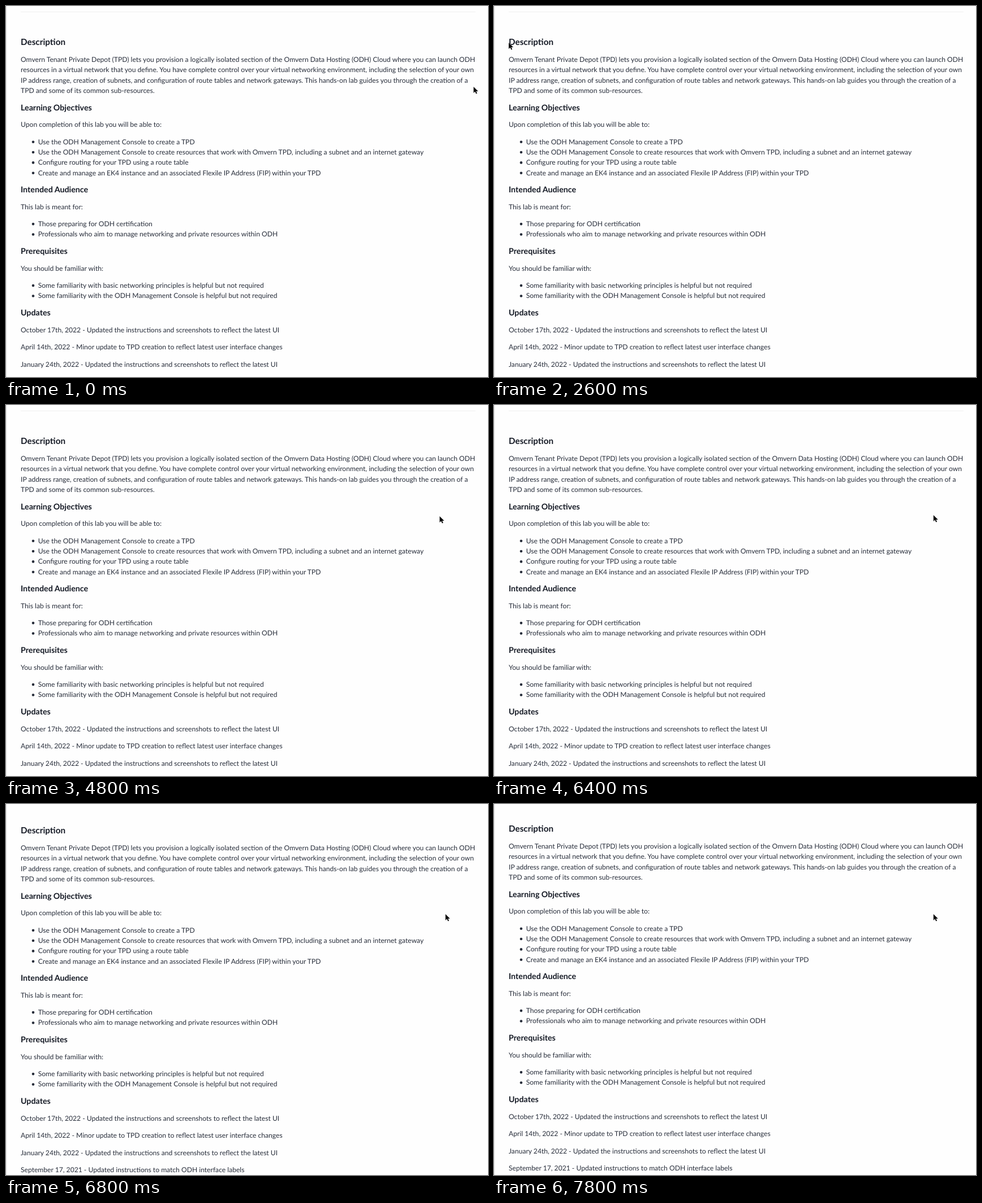
Recreate the animation shown at these times as an HTML page. Size 852 by 657 pixels, loop 8 s.

```html
<!DOCTYPE html>
<html lang="en">
<head>
<meta charset="utf-8">
<title>Lab overview</title>
<style>
  html, body { margin: 0; width: 100%; height: 100%; overflow: hidden; background: #fefefe; }
  svg { display: block; width: 852px; height: 657px; }
  text { font: 12.11px Lato, sans-serif; fill: #272d3a; text-rendering: geometricPrecision; }
  .heading { font-weight: 700; font-size: 14.25px; fill: #161b26; }
  .title { font-size: 15.25px; }
  circle { fill: #272d3a; }
</style>
</head>
<body>
<svg viewBox="0 0 852 657">
  <rect width="852" height="657" fill="#fefefe"/>
  <rect width="1.5" height="657" fill="#ebebeb"/>
  <g id="page"><rect x="26" y="10" width="804" height="1" fill="#f0f0f0"/></g>
  <path id="cursor" d="M0 0V11L2.6 8.6 4.4 12.6 6.3 11.8 4.6 8H8Z" fill="#0a0a0a" stroke="#fff" stroke-width="1" paint-order="stroke"/>
</svg>
<script>
const LOOP = 8000, STEP = 200, LINE = 18.35, PARAGRAPH = 30.55;
const page = document.getElementById('page');
const cursor = document.getElementById('cursor');

function add(tag, attrs, content = '') {
  const node = document.createElementNS('http://www.w3.org/2000/svg', tag);
  for (const name in attrs) node.setAttribute(name, attrs[name]);
  node.textContent = content;
  page.append(node);
}

const heading = (y, content, extra = '') => add('text', { x: 26, y, class: 'heading ' + extra }, content);

const lines = (y, contents, gap = LINE) =>
  contents.forEach((content, i) => add('text', { x: 26, y: y + i * gap }, content));

const bullets = (y, contents) => contents.forEach((content, i) => {
  const base = y + i * LINE;
  add('circle', { cx: 48, cy: base - 3.9, r: 2.3 });
  add('text', { x: 56.7, y: base }, content);
});

heading(69.4, 'Description', 'title');
lines(99, [
  'Omvern Tenant Private Depot (TPD) lets you provision a logically isolated section of the Omvern Data Hosting (ODH) Cloud where you can launch ODH',
  'resources in a virtual network that you define. You have complete control over your virtual networking environment, including the selection of your own',
  'IP address range, creation of subnets, and configuration of route tables and network gateways. This hands-on lab guides you through the creation of a',
  'TPD and some of its common sub-resources.'
]);

heading(185, 'Learning Objectives');
lines(214.2, ['Upon completion of this lab you will be able to:']);
bullets(244.6, [
  'Use the ODH Management Console to create a TPD',
  'Use the ODH Management Console to create resources that work with Omvern TPD, including a subnet and an internet gateway',
  'Configure routing for your TPD using a route table',
  'Create and manage an EK4 instance and an associated Flexile IP Address (FIP) within your TPD'
]);

heading(330.4, 'Intended Audience');
lines(359.6, ['This lab is meant for:']);
bullets(390, [
  'Those preparing for ODH certification',
  'Professionals who aim to manage networking and private resources within ODH'
]);

heading(439.4, 'Prerequisites');
lines(468.6, ['You should be familiar with:']);
bullets(499, [
  'Some familiarity with basic networking principles is helpful but not required',
  'Some familiarity with the ODH Management Console is helpful but not required'
]);

heading(548.3, 'Updates');
lines(577.6, [
  'October 17th, 2022 - Updated the instructions and screenshots to reflect the latest UI',
  'April 14th, 2022 - Minor update to TPD creation to reflect latest user interface changes',
  'January 24th, 2022 - Updated the instructions and screenshots to reflect the latest UI',
  'September 17, 2021 - Updated instructions to match ODH interface labels'
], PARAGRAPH);

// Keys are [time, ...values], joined linearly.
const pointerKeys = [
  [0, 826.5, 143], [1200, 826.5, 143], [1600, 520, 112], [2200, 26, 65],
  [2600, 26, 65], [3000, 300, 6], [3600, 766.5, 197],
  [6200, 766.5, 197], [6400, 776.8, 195]
];
const scrollKeys = [[0, 0], [6400, 0], [6600, 4.6], [6800, 17], [7000, 19.4], [7200, 20]];

function sample(keys, time) {
  const next = keys.findIndex(key => key[0] > time);
  if (next < 0) return keys[keys.length - 1].slice(1);
  const [from, to] = [keys[next - 1], keys[next]];
  const mix = (time - from[0]) / (to[0] - from[0]);
  return from.slice(1).map((value, i) => value + (to[i + 1] - value) * mix);
}

function draw(now) {
  const time = Math.floor(now % LOOP / STEP) * STEP;
  const [x, y] = sample(pointerKeys, time);
  const [scroll] = sample(scrollKeys, time);
  cursor.setAttribute('transform', `translate(${x} ${y})`);
  page.setAttribute('transform', `translate(0 ${-scroll})`);
}

const start = performance.now();
function tick() {
  draw(performance.now() - start);
  requestAnimationFrame(tick);
}
tick();
</script>
</body>
</html>
```
